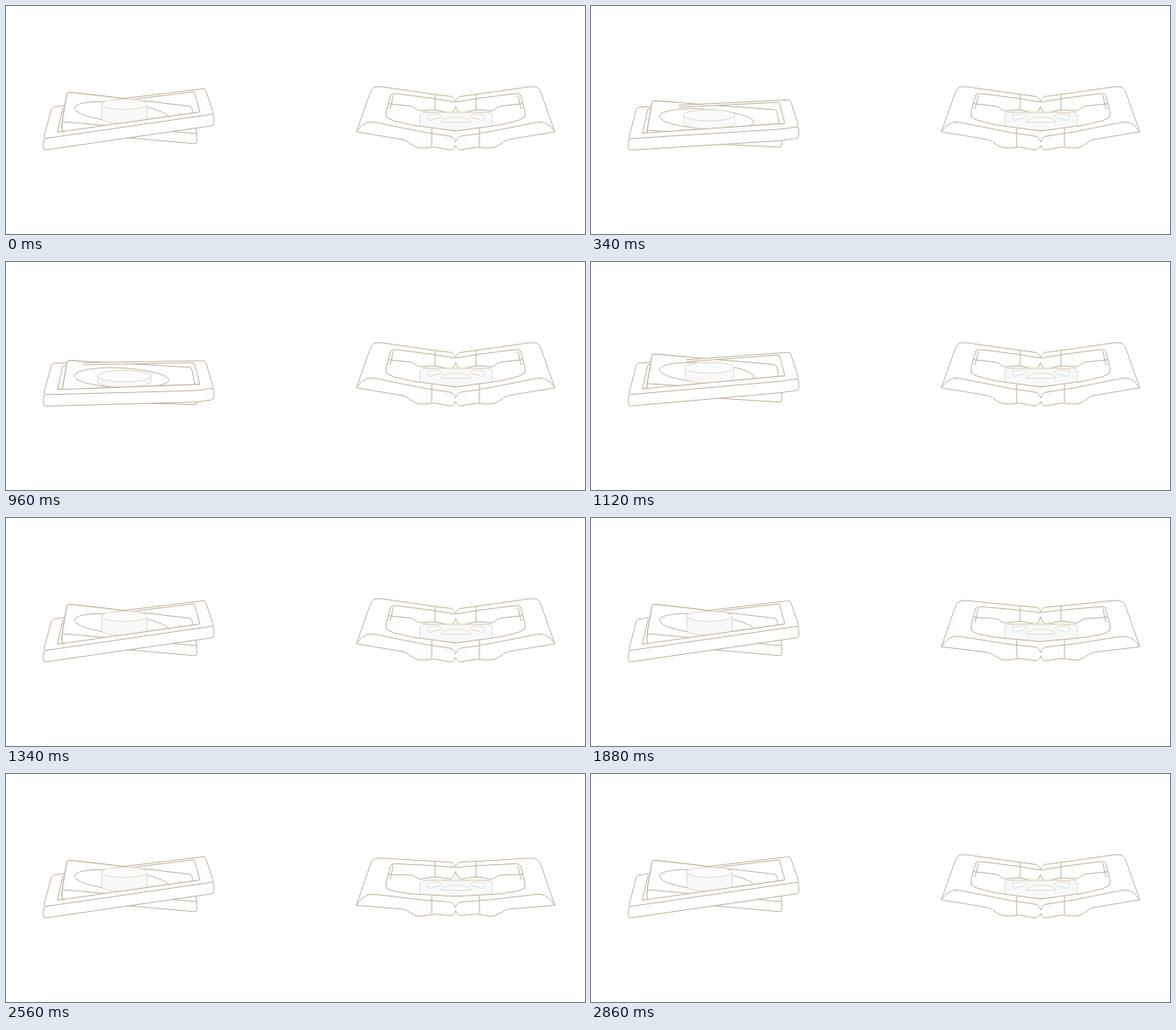
Recreate the animation shown at these times as an HTML page with a canvas. Size 680 by 268 pixels, loop 2.88 s.

```html
<!DOCTYPE html>
<html>
<head>
<meta charset="utf-8">
<style>
html, body { margin: 0; width: 100%; height: 100%; overflow: hidden; background: #fff; }
canvas { display: block; }
</style>
</head>
<body>
<canvas id="stage" width="680" height="268"></canvas>
<script>
const ctx = document.getElementById('stage').getContext('2d');
const LOOP = 2880, TAN = '#b9aa92', PALE = '#ddd8cf', GREY = '#f8f8f8', TAU = 2 * Math.PI;

function toward([ax, ay], [bx, by], r) {
  const k = Math.min(0.5, r / (Math.hypot(bx - ax, by - ay) || 1));
  return [ax + (bx - ax) * k, ay + (by - ay) * k];
}

// Add a polyline with rounded corners to the current path
function trace(pts, r = 0, closed = false) {
  const n = pts.length;
  ctx.moveTo(...(closed ? toward(pts[0], pts[1], r) : pts[0]));
  for (let i = 1; i < (closed ? n + 1 : n - 1); i++) {
    const p = pts[i % n];
    ctx.lineTo(...toward(p, pts[i - 1], r));
    ctx.quadraticCurveTo(...p, ...toward(p, pts[(i + 1) % n], r));
  }
  if (closed) ctx.closePath(); else ctx.lineTo(...pts[n - 1]);
}

function paint(fill, stroke) {
  if (fill) { ctx.fillStyle = fill; ctx.fill('evenodd'); }
  if (stroke) { ctx.strokeStyle = stroke; ctx.stroke(); }
}

function line(pts, r, stroke = TAN) {
  ctx.beginPath();
  trace(pts, r);
  paint(null, stroke);
}

function area(pts, r, fill, stroke) {
  ctx.beginPath();
  trace(pts, r, true);
  paint(fill, stroke);
}

const rect = (place, u, near, far) =>
  [place(-u, near), place(-u, far), place(u, far), place(u, near)];
const drop = ([x, y], h) => [x, y + h];

// Two plates in perspective: u runs left to right (-1..1), v front to back (0..1)
function crossedPlates(lift) {
  const outer = (u, v) => {
    const s = (u + 1) / 2;
    return [144 + u * (100 - 10 * v), 156 - 37 * v + s * (4 * v - lift * (29 - 3 * v))];
  };
  const inner = (u, v) => {
    const s = (u + 1) / 2;
    return [145 + u * (79 - 6 * v), 156 - 35 * v + s * (2 + 3 * v) - lift * (20 - 12 * s)];
  };

  function innerPlate() {
    const top = rect(inner, 1, 0, 1);
    area([top[1], top[2], top[3], drop(top[3], 12), drop(top[0], 12), top[0]], 3, '#fff', TAN);
    line([top[0], top[3]]);
    const oval = Array.from({ length: 48 }, (_, i) => {
      const a = i / 48 * TAU;
      return inner(-0.12 + 0.73 * Math.cos(a), 0.5 + 0.34 * Math.sin(a));
    });
    area(oval, 9, null, TAN);
  }

  const top = rect(outer, 1, 0, 1), hole = rect(outer, 0.85, 0.15, 0.93);
  innerPlate();
  ctx.beginPath();
  trace(top, 3, true);
  trace(hole, 1, true);
  paint('#fff', TAN);

  // Left of the crossing the inner plate lies on top
  ctx.save();
  ctx.beginPath();
  ctx.rect(0, 0, 75 + 57 * lift, 268);
  ctx.clip();
  innerPlate();
  ctx.restore();
  cylinder(lift);

  const bend = drop(outer(0.78, 0), 3 * (1 - lift));
  const edge = [top[0], bend, top[3]];
  area([hole[0], hole[3], ...edge.slice().reverse()], 0, '#fff');
  line([hole[0], hole[3]]);
  area([...edge, ...edge.map(p => drop(p, 13.5)).reverse()], 3, '#fff', TAN);
}

function cylinder(lift) {
  const x = 139, y = 141 - 25.5 * lift, h = 2.5 + 14 * lift;
  const rx = 33 - 6.5 * lift, ry = 7 - lift;
  ctx.beginPath();
  ctx.ellipse(x, y, rx, ry, 0, Math.PI, TAU);
  ctx.ellipse(x, y + h, rx, ry, 0, 0, Math.PI);
  ctx.closePath();
  paint(GREY, PALE);
  ctx.beginPath();
  ctx.ellipse(x, y, rx, ry, 0, 0, TAU);
  paint('#fbfbfb', PALE);
}

// Two mirrored halves; points are [distance from the hinge, y]
function hingedFrame(lift) {
  const bend = (pts, side) =>
    pts.map(([d, y]) => [528 + side * d, y + lift * (5 - 15 * d / 116)]);
  const both = (pts, r) => [-1, 1].forEach(side => line(bend(pts, side), r));

  const inside = [[0, 142], [53, 141.5], [75, 139], [81, 136]];
  const bottom = [[116.5, 158], [60, 160], [46, 167.5], [38, 167], [25, 164], [3, 165], [0, 159]];

  both([[0, 107], [3, 102], [25, 102], [68, 101.5], [88, 101], [97, 103], [100, 109], [116.5, 158]], 4);
  both([[0, 108], [28, 107], [71, 107], [76, 108], [82, 132], [81, 137], [75, 139]], 3);
  both([[79, 120], [51, 119.5], [43, 124], [25, 120], [4, 122], [0, 113]], 3);
  both([[24, 102], [24, 121]]);
  both([[73, 109], [77, 126]]);
  tray();

  for (const side of [-1, 1]) area(bend([...inside, ...bottom], side), 0, '#fff');
  both(inside, 4);
  both(bottom, 4);
  both([[116.5, 158], [110, 149], [101, 144], [88, 144.5], [40, 148], [3, 149], [0, 155]], 4);
  both([[28, 142], [28, 164]]);
}

function tray() {
  const mirror = pts => [-1, 1].map(side => pts.map(([d, y]) => [528.5 + side * d, y]));
  const [left, right] = mirror([[43, 146], [42, 125], [0, 125]]);
  area([...left, ...right.reverse()], 3, GREY, PALE);
  line([[489, 124.5], [569, 125]], 0, '#e2d4bf');
  for (const pts of mirror([[34, 128], [18, 127], [16, 130], [32, 135]])) area(pts, 3, '#fff', PALE);
  const [a, b] = mirror([[20, 136.5], [9, 131]]);
  area([...a, ...b.reverse()], 4, '#fff', PALE);
}

// Raised is 1, flat is 0: sinks during [a, b], rises during [c, d]
function liftAt(t, a, b, c, d, ease) {
  if (t <= a || t >= d) return 1;
  if (t < b) return 1 - ((t - a) / (b - a)) ** ease;
  return t <= c ? 0 : 1 - ((d - t) / (d - c)) ** 1.35;
}

function frame() {
  const t = Math.floor(performance.now() % LOOP / 20) * 20;
  ctx.clearRect(0, 0, 680, 268);
  ctx.lineWidth = 0.9;
  ctx.lineJoin = 'round';
  crossedPlates(liftAt(t, 0, 560, 860, 1340, 1.35));
  hingedFrame(liftAt(t, 1520, 2140, 2440, 2860, 2));
  requestAnimationFrame(frame);
}
frame();
</script>
</body>
</html>
```
